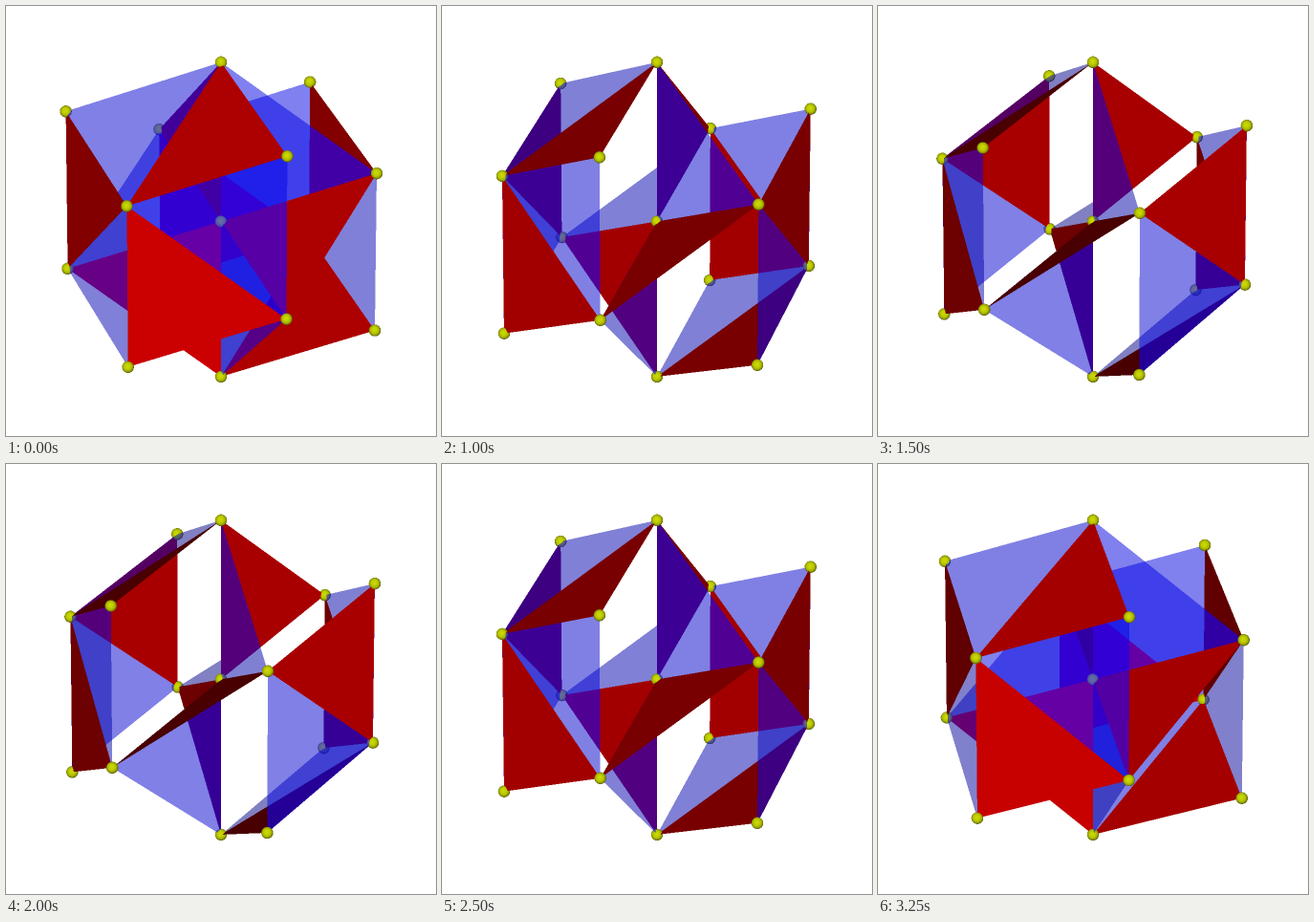
An HTML page with a canvas for the animation above (3.5 s loop, 450 px wide and 450 px high).

```html
<!DOCTYPE html>
<html lang="en">
<head>
<meta charset="utf-8">
<title>Rocking polyhedron</title>
<style>
  html, body { margin: 0; width: 100%; height: 100%; overflow: hidden; background: #fff; }
  canvas { display: block; width: 450px; height: 450px; }
</style>
</head>
<body>
<canvas id="stage" width="450" height="450"></canvas>
<script>
const SIZE = 450, SS = 2, N = SIZE * SS;
const STEP = 250, STEPS = 14;
const CX = 225, CY = 225.4;
const UNIT = 172.4 / Math.sqrt(3), DIST = 4200, BALL = 6.2;
const TILT = 17.4 * Math.PI / 180;

// Rhombic dodecahedron: cube corners, six tips and the centre
const V = {
  T: [1, 1, 1], c: [1, -1, 1], e: [1, 1, -1], f: [-1, 1, 1],
  g: [1, -1, -1], h: [-1, 1, -1], k: [-1, -1, 1], B: [-1, -1, -1],
  a: [2, 0, 0], b: [0, 2, 0], d: [0, 0, 2],
  p: [0, -2, 0], q: [0, 0, -2], r: [-2, 0, 0], O: [0, 0, 0]
};
// Each triangle: a cube edge, then a tip or the centre
const RED = 'Tcd ckp cga fhb ehq Bhr TeO kfO BgO'.split(' ');
const BLUE = 'Tca ckd cgp fhr ehb Bhq TfO geO BkO'.split(' ');

function project([x, y, z], turn) {
  const up = (x + y + z) / Math.sqrt(3) * UNIT;
  const p = (2 * z - x - y) / Math.sqrt(6) * UNIT;
  const q = (y - x) / Math.sqrt(2) * UNIT;
  const front = p * Math.cos(turn) - q * Math.sin(turn);
  const X = p * Math.sin(turn) + q * Math.cos(turn);
  const Y = up * Math.cos(TILT) - front * Math.sin(TILT);
  const Z = up * Math.sin(TILT) + front * Math.cos(TILT);
  const s = DIST / (DIST - Z);
  return { X, Y, Z, x: (CX + X * s) * SS, y: (CY - Y * s) * SS, w: DIST * s };
}

// How squarely a triangle faces the viewer, 0 to 1
function facing(a, b, c) {
  const u = [b.X - a.X, b.Y - a.Y, b.Z - a.Z];
  const v = [c.X - a.X, c.Y - a.Y, c.Z - a.Z];
  const nx = u[1] * v[2] - u[2] * v[1];
  const ny = u[2] * v[0] - u[0] * v[2];
  const nz = u[0] * v[1] - u[1] * v[0];
  return Math.abs(nz) / Math.hypot(nx, ny, nz);
}

function fillTriangle(a, b, c, plot) {
  const area = (b.x - a.x) * (c.y - a.y) - (c.x - a.x) * (b.y - a.y);
  if (Math.abs(area) < 1e-6) return;
  const x0 = Math.floor(Math.min(a.x, b.x, c.x)), x1 = Math.ceil(Math.max(a.x, b.x, c.x));
  const y0 = Math.floor(Math.min(a.y, b.y, c.y)), y1 = Math.ceil(Math.max(a.y, b.y, c.y));
  for (let y = y0; y < y1; y++) {
    for (let x = x0; x < x1; x++) {
      const px = x + 0.5 - a.x, py = y + 0.5 - a.y;
      const s = (px * (c.y - a.y) - (c.x - a.x) * py) / area;
      const t = ((b.x - a.x) * py - px * (b.y - a.y)) / area;
      if (s >= 0 && t >= 0 && s + t <= 1) {
        plot(y * N + x, a.w + s * (b.w - a.w) + t * (c.w - a.w));
      }
    }
  }
}

function fillBall(o, plot) {
  const r = BALL * SS;
  for (let y = Math.floor(o.y - r); y <= o.y + r; y++) {
    for (let x = Math.floor(o.x - r); x <= o.x + r; x++) {
      const nx = (x + 0.5 - o.x) / r, ny = (y + 0.5 - o.y) / r;
      const rest = 1 - nx * nx - ny * ny;
      if (rest < 0) continue;
      const nz = Math.sqrt(rest);
      const light = Math.sqrt(Math.max(0.15, 0.98 * nz - 0.08 * nx - 0.12 * ny));
      plot(y * N + x, o.w + nz * BALL, light);
    }
  }
}

function render(index) {
  const turn = (24.15 - 11.22 * index) * Math.PI / 180;
  const pts = {};
  for (const name in V) pts[name] = project(V[name], turn);

  const big = document.createElement('canvas');
  big.width = big.height = N;
  const g = big.getContext('2d');
  const img = g.createImageData(N, N), px = img.data.fill(255);
  const depth = new Float32Array(N * N);

  function solid(i, w, r, gr, b) {
    if (w <= depth[i]) return;
    depth[i] = w;
    px[i * 4] = r;
    px[i * 4 + 1] = gr;
    px[i * 4 + 2] = b;
  }
  // Halves what lies behind and adds blue, which levels off as it brightens
  function glass(i, w, glow) {
    if (w < depth[i] - 0.3) return;
    px[i * 4] *= 0.5;
    px[i * 4 + 1] *= 0.5;
    px[i * 4 + 2] = 255 * glow + px[i * 4 + 2] * (0.5 - 0.325 * glow);
  }

  for (const t of RED) {
    const [a, b, c] = [...t].map(n => pts[n]);
    const tone = 208 * Math.sqrt(facing(a, b, c));
    fillTriangle(a, b, c, (i, w) => solid(i, w, tone, 0, 0));
  }
  for (const name in pts) {
    fillBall(pts[name], (i, w, l) => solid(i, w, 203 * l, 218 * l, 0));
  }

  // Back to front: cells around the tips, with the inner walls between them
  const order = t => {
    const mid = (pts[t[0]].Z + pts[t[1]].Z) / 2;
    return t[2] === 'O' ? mid / 2 : pts[t[2]].Z / 2 + mid * 0.001;
  };
  for (const t of [...BLUE].sort((m, n) => order(m) - order(n))) {
    const [a, b, c] = [...t].map(n => pts[n]);
    const glow = 0.66 * Math.pow(facing(a, b, c), 0.25);
    fillTriangle(a, b, c, (i, w) => glass(i, w, glow));
  }

  g.putImageData(img, 0, 0);
  return big;
}

const ctx = document.getElementById('stage').getContext('2d');
const poses = Array.from({ length: STEPS / 2 + 1 }, (_, i) => render(i));
let shown = -1;

function draw(now) {
  const step = Math.floor(Math.max(0, now) / STEP) % STEPS;
  const pose = Math.min(step, STEPS - step);
  if (pose !== shown) {
    ctx.drawImage(poses[pose], 0, 0, SIZE, SIZE);
    shown = pose;
  }
  requestAnimationFrame(draw);
}
draw(performance.now());
</script>
</body>
</html>
```
